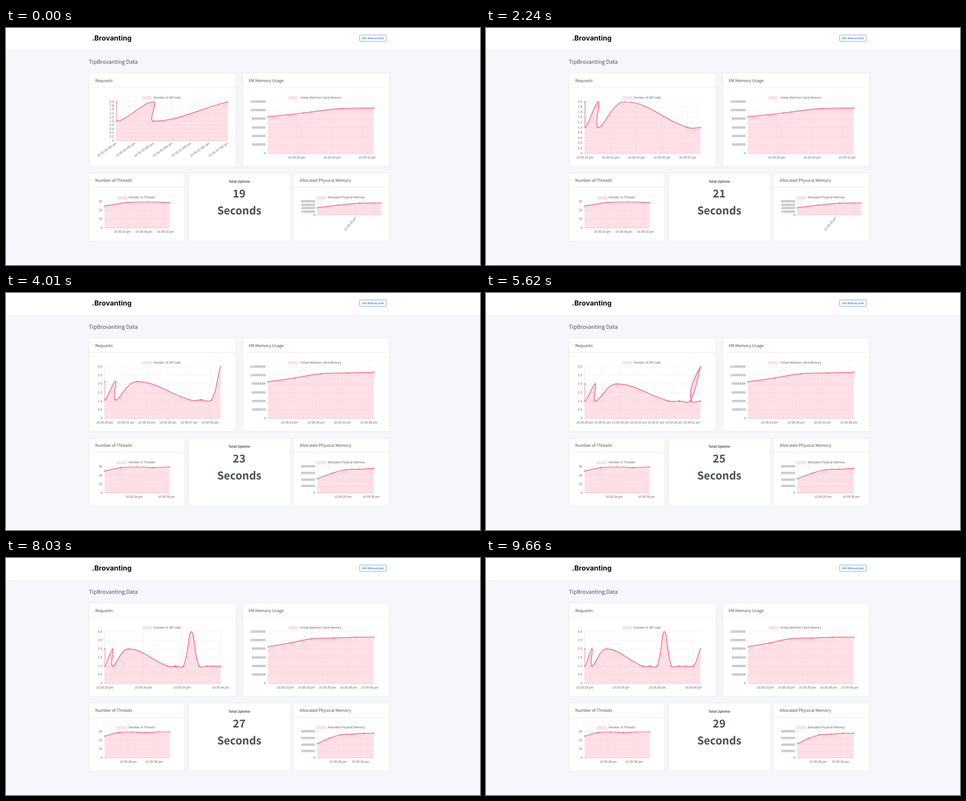
An HTML page with a canvas that plays this animation: 1056x530 px, repeating every 9.91 s.

```html
<!DOCTYPE html>
<html lang="en">
<head>
<meta charset="utf-8">
<title>TipBrovanting Data</title>
<style>
html, body { margin: 0; width: 100%; height: 100%; overflow: hidden; background: #f5f7fb; }
svg, canvas { position: absolute; left: 0; top: 0; width: 1056px; height: 530px; }
text { font-family: "Noto Sans CJK JP", "Noto Sans CJK SC", "Open Sans", sans-serif; fill: #495057; text-rendering: geometricPrecision; }
.brand { font: 700 15.6px Inter, sans-serif; fill: #0b0b0d; }
.title { font-size: 12.1px; }
.head { font-size: 9.2px; }
.bold { font-weight: 700; text-anchor: middle; }
.cards rect { fill: #fff; stroke: #dfe4ec; stroke-width: .8; filter: drop-shadow(0 .6px .6px rgba(0,0,0,.05)); }
.cards path { stroke: #dfe4ec; stroke-width: .8; }
</style>
</head>
<body>
<svg viewBox="0 0 1056 530">
  <rect width="1056" height="50" fill="#fff"/>
  <rect y="50" width="1056" height=".8" fill="#dfe4ec"/>
  <text class="brand" x="191.5" y="28">.Brovanting</text>
  <rect x="787.8" y="15.6" width="59.6" height="14.2" rx="1.8" fill="#fff" stroke="#467fcf" stroke-width=".8"/>
  <text class="bold" x="817.5" y="25" style="font-size:6.3px;fill:#467fcf">Get data as json</text>
  <text class="title" x="184.6" y="80">TipBrovanting Data</text>
  <g class="cards">
    <rect x="185.2" y="100.6" width="327.4" height="209.4" rx="1.8"/>
    <rect x="527" y="100.6" width="327.4" height="209.4" rx="1.8"/>
    <rect x="185.2" y="324.3" width="213.6" height="152.3" rx="1.8"/>
    <rect x="406.2" y="324.3" width="227" height="152.3" rx="1.8"/>
    <rect x="640.8" y="324.3" width="213.6" height="152.3" rx="1.8"/>
    <path d="M185.2 132.6h327.4M527 132.6h327.4M185.2 356.4h213.6M640.8 356.4h213.6"/>
  </g>
  <text class="head" x="198.8" y="120.5">Requests</text>
  <text class="head" x="540.4" y="120.5">VM Memory Usage</text>
  <text class="head" x="198.8" y="344.1">Number of Threads</text>
  <text class="head" x="654.2" y="344.1">Allocated Physical Memory</text>
  <text class="bold" x="519.7" y="346" style="font-size:7.7px">Total Uptime</text>
  <text class="bold" id="uptime" x="519.5" y="378.7" style="font-size:24px">19</text>
  <text class="bold" x="519.7" y="417.4" style="font-size:24px">Seconds</text>
</svg>
<canvas id="view"></canvas>
<script>
const LOOP = 9910, EASE_MS = 1000, SCALE = 0.571, TICK = 10 * SCALE;
const PINK = 'rgb(255,99,132)', PALE = 'rgba(255,99,132,0.2)';
const TICKS_AT = [610, 1600, 2600, 3620, 4630, 5620, 6640, 7630, 8650, 9660];

const canvas = document.getElementById('view');
const uptime = document.getElementById('uptime');
const dpr = window.devicePixelRatio || 1;
canvas.width = 1056 * dpr;
canvas.height = 530 * dpr;
const ctx = canvas.getContext('2d');

const clamp = (v, lo, hi) => Math.max(lo, Math.min(hi, v));
const every5s = [0, 1, 2, 3, 4, 5].map(k => k * 5.013);

// A stage: start time, point count, plot box, first x tick, x step, label rotation, y maximum, y step
const stage = (at, count, box, first, step, yMax, yStep, rot = 0) =>
  ({ at, count, box, first, step, yMax, yStep, rot });

const reqBox = [220, 165, 478, 280.3];
const vmBox = [584, 165, 819.6, 280.3];
const threadBox = [220, 388.6, 364.2, 447];
const memBox = [694, 388.6, 819.6, 447];

const charts = [
  {
    legend: [302.8, 156, 'Number of API calls'],
    times: [0, 0, 1, 1, 3, 8, 9, 9, 10, 11, 12, 13, 14, 15, 16],
    values: [2, 1, 2, 1, 2, 1, 1, 1, 1, 3, 1, 1, 1, 1, 2],
    start: 29,
    format: v => v ? v.toFixed(1) : '0',
    stages: [
      stage(0, 5, [246, 165, 494.2, 251.7], 0, 0.5, 2, 0.2, 35),
      stage(1600, 7, reqBox, 0, 2, 2, 0.2),
      stage(2600, 9, reqBox, 0, 2, 2, 0.2),
      stage(3620, 10, reqBox, 0, 2, 3, 0.5),
      stage(5620, 12, reqBox, 0, 2, 3, 0.5),
      stage(7630, 14, reqBox, 0, 5, 3, 0.5),
      stage(8650, 15, reqBox, 0, 5, 3, 0.5)
    ]
  },
  {
    legend: [629, 156, 'Virtual Machine Used Memory'],
    times: every5s,
    values: [84.9e6, 94e6, 103.7e6, 105.5e6, 107.4e6, 107.5e6],
    start: 19,
    format: String,
    stages: [
      stage(0, 4, vmBox, 4.07, 5, 120e6, 20e6),
      stage(2600, 5, vmBox, 4.07, 5, 120e6, 20e6),
      stage(7630, 6, vmBox, 4.07, 5, 120e6, 20e6)
    ]
  },
  {
    legend: [246.7, 379.4, 'Number of Threads'],
    times: every5s,
    values: [25, 29, 30, 29, 30, 30],
    start: 19,
    format: String,
    stages: [
      stage(0, 4, threadBox, 4.07, 5, 30, 10),
      stage(2600, 5, threadBox, 9.07, 10, 30, 10),
      stage(7630, 6, threadBox, 9.07, 10, 30, 10)
    ]
  },
  {
    legend: [690.8, 379.4, 'Allocated Physical Memory'],
    times: every5s,
    values: [43.7e6, 59.6e6, 70.9e6, 72.6e6, 75.1e6, 75.3e6],
    start: 19,
    format: String,
    stages: [
      stage(0, 4, [694, 388.6, 835.4, 418], 9.07, 10, 80e6, 20e6, 50),
      stage(2600, 5, memBox, 9.07, 10, 80e6, 20e6),
      stage(7630, 6, memBox, 9.07, 10, 80e6, 20e6)
    ]
  }
];

// Points of a stage with their spline handles
function buildPoints(chart, st) {
  const [l, t, r, b] = st.box, n = st.count;
  st.span = chart.times[n - 1];
  const pts = chart.times.slice(0, n).map((sec, i) => ({
    x: l + sec / st.span * (r - l),
    y: b - chart.values[i] / st.yMax * (b - t)
  }));
  return pts.map((p, i) => {
    const a = pts[i - 1] || p, c = pts[i + 1] || p;
    const before = Math.hypot(p.x - a.x, p.y - a.y);
    const after = Math.hypot(c.x - p.x, c.y - p.y);
    const fa = 0.4 * before / (before + after), fb = 0.4 * after / (before + after);
    return {
      x: p.x, y: p.y,
      inX: clamp(p.x - fa * (c.x - a.x), l, r), inY: clamp(p.y - fa * (c.y - a.y), t, b),
      outX: clamp(p.x + fb * (c.x - a.x), l, r), outY: clamp(p.y + fb * (c.y - a.y), t, b)
    };
  });
}
for (const chart of charts)
  for (const st of chart.stages) st.points = buildPoints(chart, st);

function mix(a, b, k) {
  const out = {};
  for (const key in b) out[key] = a[key] + (b[key] - a[key]) * k;
  return out;
}

function rule(x1, y1, x2, y2, alpha = 0.1) {
  ctx.strokeStyle = `rgba(0,0,0,${alpha})`;
  ctx.lineWidth = SCALE;
  ctx.beginPath();
  ctx.moveTo(x1, y1);
  ctx.lineTo(x2, y2);
  ctx.stroke();
}

function label(text, x, y, align, rot = 0) {
  ctx.save();
  ctx.translate(x, y);
  ctx.rotate(-rot * Math.PI / 180);
  ctx.textAlign = align;
  ctx.fillStyle = '#666';
  ctx.fillText(text, 0, 0);
  ctx.restore();
}

function clock(sec, fine) {
  const text = fine ? sec.toFixed(3) : Math.round(sec);
  return `10:35:${text} pm`;
}

function drawAxes(chart, st) {
  const [l, t, r, b] = st.box;
  for (let sec = st.first; sec <= st.span + 0.01; sec += st.step) {
    const x = l + sec / st.span * (r - l);
    rule(x, t, x, b + TICK);
    const text = clock(chart.start + sec, st.step < 1);
    if (st.rot) label(text, x, b + TICK, 'right', st.rot);
    else label(text, x, b + 9.5, 'center');
  }
  const rows = Math.round(st.yMax / st.yStep);
  for (let i = 0; i <= rows; i++) {
    const y = b - i / rows * (b - t);
    rule(l - TICK, y, r, y, i ? 0.1 : 0.25);
    label(chart.format(i * st.yStep), l - TICK, y, 'right');
  }
  rule(l, t, l, b);
  rule(l, b, r, b);
}

function drawSeries(pts, [l, t, r, b]) {
  const last = pts[pts.length - 1];
  const trace = () => {
    ctx.beginPath();
    ctx.moveTo(pts[0].x, pts[0].y);
    for (let i = 1; i < pts.length; i++) {
      const a = pts[i - 1], p = pts[i];
      ctx.bezierCurveTo(a.outX, a.outY, p.inX, p.inY, p.x, p.y);
    }
  };
  ctx.save();
  ctx.beginPath();
  ctx.rect(l, t, r - l, b - t);
  ctx.clip();
  trace();
  ctx.lineTo(last.x, b);
  ctx.lineTo(pts[0].x, b);
  ctx.closePath();
  ctx.fillStyle = PALE;
  ctx.fill();
  trace();
  ctx.strokeStyle = PINK;
  ctx.lineWidth = 3 * SCALE;
  ctx.stroke();
  ctx.restore();

  ctx.strokeStyle = PINK;
  ctx.lineWidth = SCALE;
  for (const p of pts) {
    ctx.beginPath();
    ctx.arc(p.x, p.y, 3 * SCALE, 0, 2 * Math.PI);
    ctx.fill();
    ctx.stroke();
  }
}

function drawChart(chart, time) {
  const index = chart.stages.filter(st => st.at <= time).length - 1;
  const st = chart.stages[index];
  const old = index ? chart.stages[index - 1].points : [];
  const k = 1 - Math.pow(1 - clamp((time - st.at) / EASE_MS, 0, 1), 4);
  const pts = st.points.map((p, i) => old[i] ? mix(old[i], p, k) : p);

  const [x, y, text] = chart.legend;
  ctx.fillStyle = PALE;
  ctx.fillRect(x, y - 6 * SCALE, 40 * SCALE, 12 * SCALE);
  label(text, x + 46 * SCALE, y, 'left');
  drawAxes(chart, st);
  ctx.fillStyle = PALE;
  drawSeries(pts, st.box);
}

let begin;
function frame(now) {
  if (begin === undefined) begin = now;
  const time = (now - begin) % LOOP;
  ctx.setTransform(dpr, 0, 0, dpr, 0, 0);
  ctx.clearRect(0, 0, 1056, 530);
  ctx.font = '6.85px "Liberation Sans", Arial, sans-serif';
  ctx.textBaseline = 'middle';
  for (const chart of charts) drawChart(chart, time);
  const seconds = String(19 + TICKS_AT.filter(at => at <= time).length);
  if (uptime.textContent !== seconds) uptime.textContent = seconds;
  requestAnimationFrame(frame);
}
requestAnimationFrame(frame);
</script>
</body>
</html>
```
